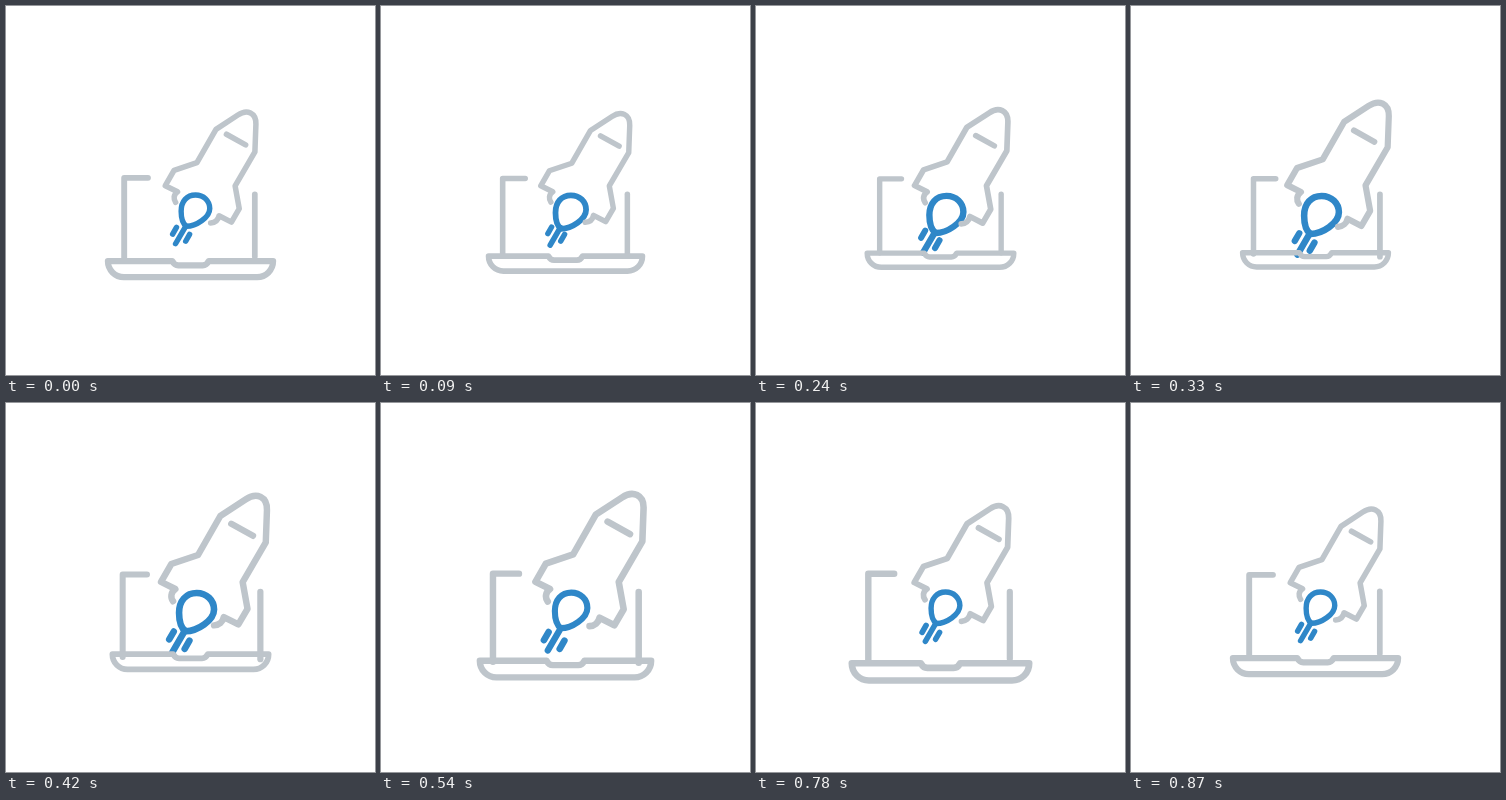
These frames come from a looping animation (369x369 px, 900 ms). An HTML page:

```html
<!DOCTYPE html>
<html lang="en">
<head>
<meta charset="utf-8">
<title>Rocket launch</title>
<style>
  html, body { margin: 0; width: 100%; height: 100%; overflow: hidden; background: #fff; }
  svg { display: block; width: 100vw; height: 100vh; }
  path { fill: none; stroke: #bec5cb; stroke-width: 6; stroke-linecap: round; stroke-linejoin: round; }
  .fire { stroke: #2f87c8; }
</style>
</head>
<body>
<!-- Parts are in stagger order: each one pulses a little after the one before it. -->
<svg viewBox="-184.5 -184.5 369 369">
  <path class="fire" d="M-4.5 39.8C-8.5 37-10.4 30-10.4 23C-10.4 12-4 5 5.6 5C14.6 5 21.4 11.5 21.4 20C21.4 30 6 39.8-4.5 39.8Z"/>
  <path class="fire" d="M-5.5 40L-16.6 59.1"/>
  <path class="fire" d="M-1 48.6L-5.3 56.1"/>
  <path class="fire" d="M-15.4 40.5L-19.6 47.8"/>
  <path d="M-16.2 12.8C-18.6 9.5-18.6 4.5-14.1 1.4L-27.4-5.2L-17.9-21.8L7-30.2L27.7-66.5L51.5-82C61.5-88.8 71.5-84.5 71.1-72L70-42L48.5-5L53 19.8L44.5 34.4L31 27.5C30 32 26.5 35 21.9 35.2"/>
  <path d="M38.5-60.2L59-48.8"/>
  <path d="M67.4 4.1V69.2"/>
  <path d="M-43.3-12.9H-67.5V69.2"/>
  <path d="M-81 69.2C-81 78-74 84.9-65.3 84.9H65.3C74 84.9 81 78 81 69.2H17.8C16.6 71.8 14.8 73.4 12 73.4H-12C-14.8 73.4-16.6 71.8-17.8 69.2Z"/>
</svg>
<script>
  const LOOP = 900, TICK = 30, PERIOD = 870, STAGGER = 41;
  const parts = document.querySelectorAll('path');

  const bezier = (a, b, u) => 3 * a * u * (1 - u) ** 2 + 3 * b * u * u * (1 - u) + u ** 3;

  // Same curve as the CSS "ease" keyword.
  function ease(x) {
    let lo = 0, hi = 1;
    for (let i = 0; i < 24; i++) {
      const mid = (lo + hi) / 2;
      if (bezier(0.25, 0.25, mid) < x) lo = mid; else hi = mid;
    }
    return bezier(0.1, 1, lo);
  }

  // Grows from 0.9 to 1.1 in the first half of the period, shrinks back in the second.
  function pulse(t) {
    const x = ((t + PERIOD) % PERIOD) / PERIOD * 2;
    return 0.9 + 0.2 * (x < 1 ? ease(x) : 1 - ease(x - 1));
  }

  function draw(now) {
    const t = Math.floor((now % LOOP) / TICK) * TICK;
    parts.forEach((part, i) =>
      part.setAttribute('transform', `scale(${pulse(t - i * STAGGER).toFixed(4)})`));
  }

  const start = performance.now();
  function frame() {
    draw(performance.now() - start);
    requestAnimationFrame(frame);
  }
  frame();
</script>
</body>
</html>
```
